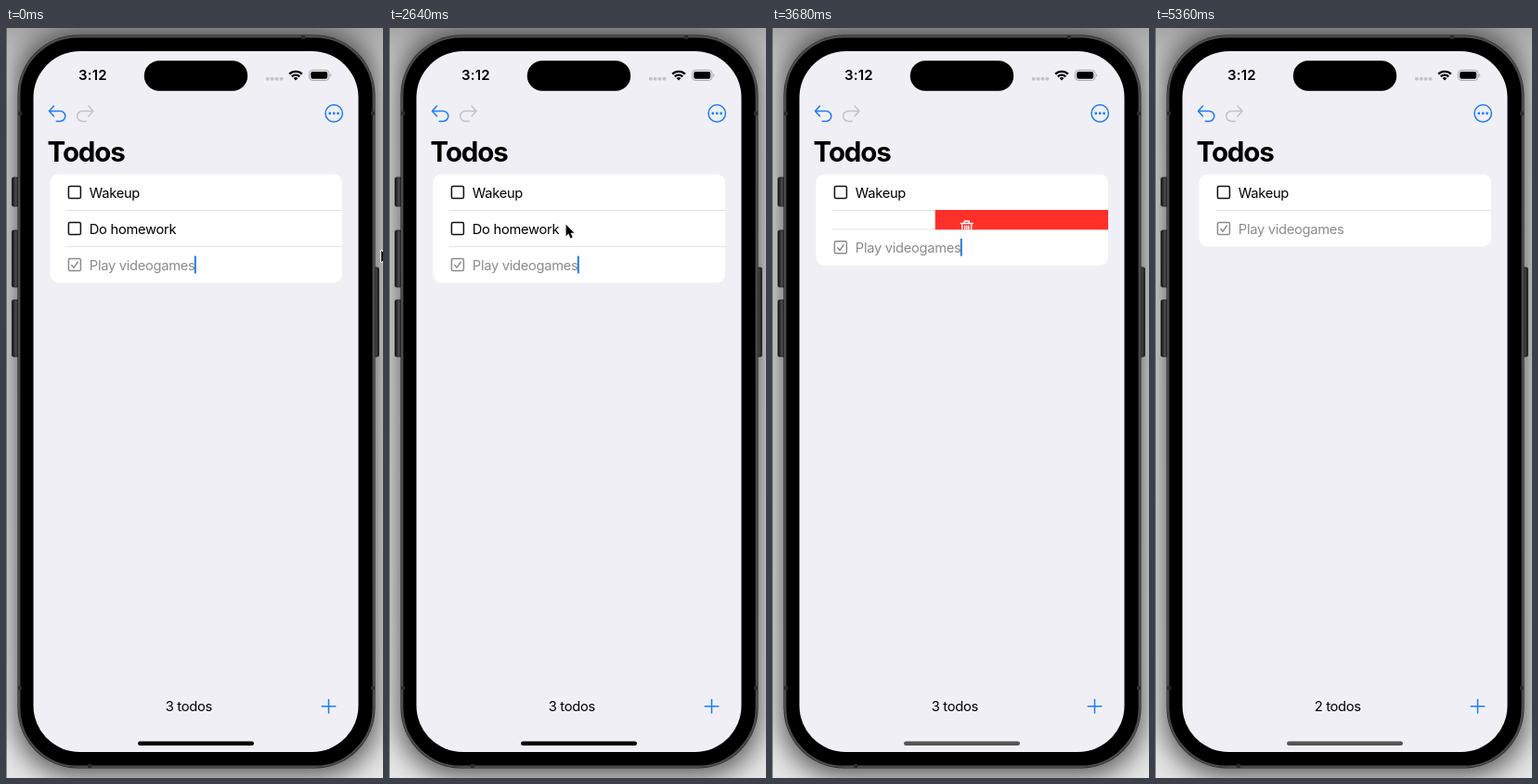
These frames come from a looping animation (406x808 px, 5440 ms). An HTML page:

```html
<!DOCTYPE html>
<html lang="en">
<head>
<meta charset="utf-8">
<title>Todos</title>
<style>
  html, body { margin: 0; width: 100%; height: 100%; overflow: hidden; background: #e4e4e4; }
  svg { display: block; width: 406px; height: 808px; }
  text { font: 400 14.7px Inter, "Liberation Sans", sans-serif; letter-spacing: -.28px; font-optical-sizing: none; }
  .clock { font-size: 15px; font-weight: 600; letter-spacing: .2px; }
  .title { font-size: 29.5px; font-weight: 700; letter-spacing: -1.1px; }
  .done { fill: #8b8b8e; }
  .line { fill: none; stroke-linecap: round; stroke-linejoin: round; }
  .blue { stroke: #1c7df2; stroke-width: 1.5; }
  .pale { stroke: #c3c2c8; stroke-width: 1.5; }
  .rule { fill: #e3e3e6; }
</style>
</head>
<body>
<svg viewBox="0 0 406 808">
  <defs>
    <filter id="blur" x="-20%" y="-20%" width="140%" height="140%"><feGaussianBlur stdDeviation="14"/></filter>
    <linearGradient id="wall" x2="0" y2="1">
      <stop offset="0" stop-color="#a8a8a8"/><stop offset=".08" stop-color="#dedede"/><stop offset="1" stop-color="#e6e6e6"/>
    </linearGradient>
    <linearGradient id="side">
      <stop offset="0" stop-color="#111"/><stop offset=".5" stop-color="#4a4a4a"/><stop offset="1" stop-color="#1a1a1a"/>
    </linearGradient>
    <clipPath id="rowClip"><rect id="rowBox" x="47.5" y="196" width="314.5" height="40"/></clipPath>
    <rect id="box" x="67.4" y="-6.5" width="13" height="13" rx="1.6" fill="none" stroke-width="1.5"/>
  </defs>

  <!-- backdrop and phone body -->
  <rect width="406" height="808" fill="url(#wall)"/>
  <rect x="10" y="4" width="390" height="802" rx="64" opacity=".62" filter="url(#blur)"/>
  <rect width="1" height="808" opacity=".4"/>
  <g fill="url(#side)" stroke="#1b1b1b" stroke-width=".8">
    <rect x="6.5" y="161" width="8" height="31" rx="1.5"/>
    <rect x="6.5" y="218" width="8" height="61" rx="1.5"/>
    <rect x="6.5" y="293" width="8" height="61" rx="1.5"/>
    <rect x="394" y="258" width="7.5" height="96" rx="1.5"/>
  </g>
  <rect x="12.5" y="7.5" width="385" height="790" rx="65" fill="#1d1d1d"/>
  <rect x="14.2" y="9.2" width="381.6" height="786.6" rx="63.3" fill="#000" stroke="#4b4b4b" stroke-width="2.4"/>
  <path d="M13 92h4M393 92h4M13 711h4M393 711h4M320 8v4M90 793v4" stroke="#2b2b2b" stroke-width="4"/>
  <rect x="29.5" y="25" width="350" height="755" rx="50" fill="#f0eff6"/>

  <!-- status bar -->
  <rect x="148.8" y="35.2" width="111.4" height="32.5" rx="16.25"/>
  <text class="clock" x="78" y="56.3">3:12</text>
  <g fill="#c4c3ca">
    <rect x="280" y="53" width="3.6" height="3.4" rx="1"/><rect x="284.9" y="53" width="3.6" height="3.4" rx="1"/>
    <rect x="289.8" y="53" width="3.6" height="3.4" rx="1"/><rect x="294.7" y="53" width="3.6" height="3.4" rx="1"/>
  </g>
  <path d="M305.2 49.6a9.6 9.6 0 0 1 13.6 0M307.8 52.4a6 6 0 0 1 8.4 0" fill="none" stroke="#000" stroke-width="2.3"/>
  <path d="M312 56.6l-2.4-2.5a3.4 3.4 0 0 1 4.8 0z"/>
  <rect x="326.5" y="45.4" width="21.4" height="11" rx="3.4" fill="none" stroke="#a5a4ab"/>
  <rect x="328.2" y="47.1" width="18" height="7.6" rx="2"/>
  <path d="M349.2 49.2a2 2 0 0 1 0 3.6z" fill="#a5a4ab"/>

  <!-- navigation bar -->
  <path class="line blue" d="M51.5 84l-5 5.5 5 5.5M47 89.5h11.3a5.5 5.5 0 0 1 0 11h-4"/>
  <path class="line pale" d="M89 84l5 5.5-5 5.5M93.5 89.5h-11.3a5.5 5.5 0 0 0 0 11h4"/>
  <circle class="line blue" cx="353.2" cy="92" r="9.2"/>
  <g fill="#1c7df2">
    <circle cx="348.8" cy="92" r="1.4"/><circle cx="353.2" cy="92" r="1.4"/><circle cx="357.6" cy="92" r="1.4"/>
  </g>
  <text class="title" x="44.6" y="143.8">Todos</text>

  <!-- list -->
  <rect id="list" x="47.5" y="157.5" width="314.5" height="117" rx="9" fill="#fff"/>
  <rect class="rule" x="65" y="196" width="297" height="1"/>
  <use href="#box" y="177" stroke="#111"/>
  <text x="89.8" y="182.6">Wakeup</text>
  <g id="below">
    <rect class="rule" x="65" y="235" width="297" height="1"/>
    <use href="#box" y="255" stroke="#8b8b8e"/>
    <path class="line" d="M70.7 255.5l2.3 2.7 4.3-6.2" stroke="#8b8b8e" stroke-width="1.4"/>
    <text class="done" x="89.8" y="260.7">Play videogames</text>
    <rect id="caret" x="202.8" y="245.5" width="2" height="19" rx=".6" fill="#2478e0"/>
  </g>
  <g clip-path="url(#rowClip)">
    <g id="row">
      <use href="#box" y="216" stroke="#111"/>
      <text x="89.8" y="221.6">Do homework</text>
    </g>
    <rect id="red" x="362" y="196" width="0" height="40" fill="#fe3029"/>
    <path id="trash" class="line" stroke="#fff" stroke-width="1.4" d="M-6.5-5h13M-2.5-5.2v-2.3h5v2.3M-5.2-4.6l.8 11.2q.1 1.2 1.3 1.2h6.2q1.2 0 1.3-1.2l.8-11.2M-2.2-2.3l.3 7.4M0-2.3v7.4M2.2-2.3l-.3 7.4"/>
  </g>

  <!-- toolbar -->
  <text id="count" x="171.7" y="736">3 todos</text>
  <path class="line blue" d="M340.2 730.7h14.6M347.5 723.4v14.6"/>
  <rect id="home" x="142" y="768.4" width="125" height="4.6" rx="2.3"/>

  <path id="cursor" d="M.6.8v12.400l2.800-2.600 2.100 4.900 2.200-.9-2.100-4.800h3.900z" stroke="#fff" stroke-width="1.8" stroke-linejoin="round" paint-order="stroke"/>
</svg>
<script>
  const LOOP = 5440, STEP = 80, ROW = 39, OPEN = 68, FULL = 314.5;
  const $ = id => document.getElementById(id);
  const clamp = v => Math.min(1, Math.max(0, v));
  const ramp = (t, from, to) => clamp((t - from) / (to - from));
  const smooth = p => p * p * (3 - 2 * p);
  const mix = (a, b, p) => a + (b - a) * p;

  // Pointer stops: time, x, y
  const path = [
    [0, 403.6, 239], [1680, 403.6, 239], [2320, 190, 211], [2680, 190, 211],
    [2920, 120, 211], [3200, 369, 215], [3360, 414, 217], [LOOP, 414, 217]
  ];

  function pointer(t) {
    const i = path.findIndex(p => p[0] > t);
    const [t0, x0, y0] = path[i - 1], [t1, x1, y1] = path[i];
    const p = smooth(ramp(t, t0, t1));
    return [mix(x0, x1, p), mix(y0, y1, p)];
  }

  function caretAlpha(t) {
    const phase = t % 1000;
    return phase < 500 ? 1 - ramp(phase, 0, 60) + ramp(phase, 420, 500) : 1;
  }

  function draw(t) {
    const gone = smooth(ramp(t, 3500, 3870));
    const shift = mix(OPEN * smooth(ramp(t, 2680, 2960)), FULL, gone);
    const height = ROW * (1 - gone);
    const left = 362 - shift;

    $("list").setAttribute("height", 2 * ROW + height);
    $("rowBox").setAttribute("height", gone < 1 ? height + 1 : 0);
    $("below").setAttribute("transform", `translate(0 ${height - ROW})`);
    $("row").setAttribute("transform", `translate(${-shift} 0)`);
    $("red").setAttribute("x", left);
    $("red").setAttribute("width", shift);
    $("trash").setAttribute("transform", `translate(${left + Math.min(shift, OPEN) / 2} 215.5)`);
    $("trash").setAttribute("opacity", ramp(shift, 10, 40));
    $("caret").setAttribute("opacity", caretAlpha(t));
    $("cursor").setAttribute("transform", `translate(${pointer(t)})`);
    $("count").textContent = t < 4000 ? "3 todos" : "2 todos";
    const grey = mix(0, 84, ramp(t, 3400, 3600));
    $("home").setAttribute("fill", `rgb(${grey},${grey},${grey})`);
  }

  const start = performance.now();
  function tick() {
    const t = (performance.now() - start) % LOOP;
    draw(Math.floor(t / STEP) * STEP);
    requestAnimationFrame(tick);
  }
  tick();
</script>
</body>
</html>
```
